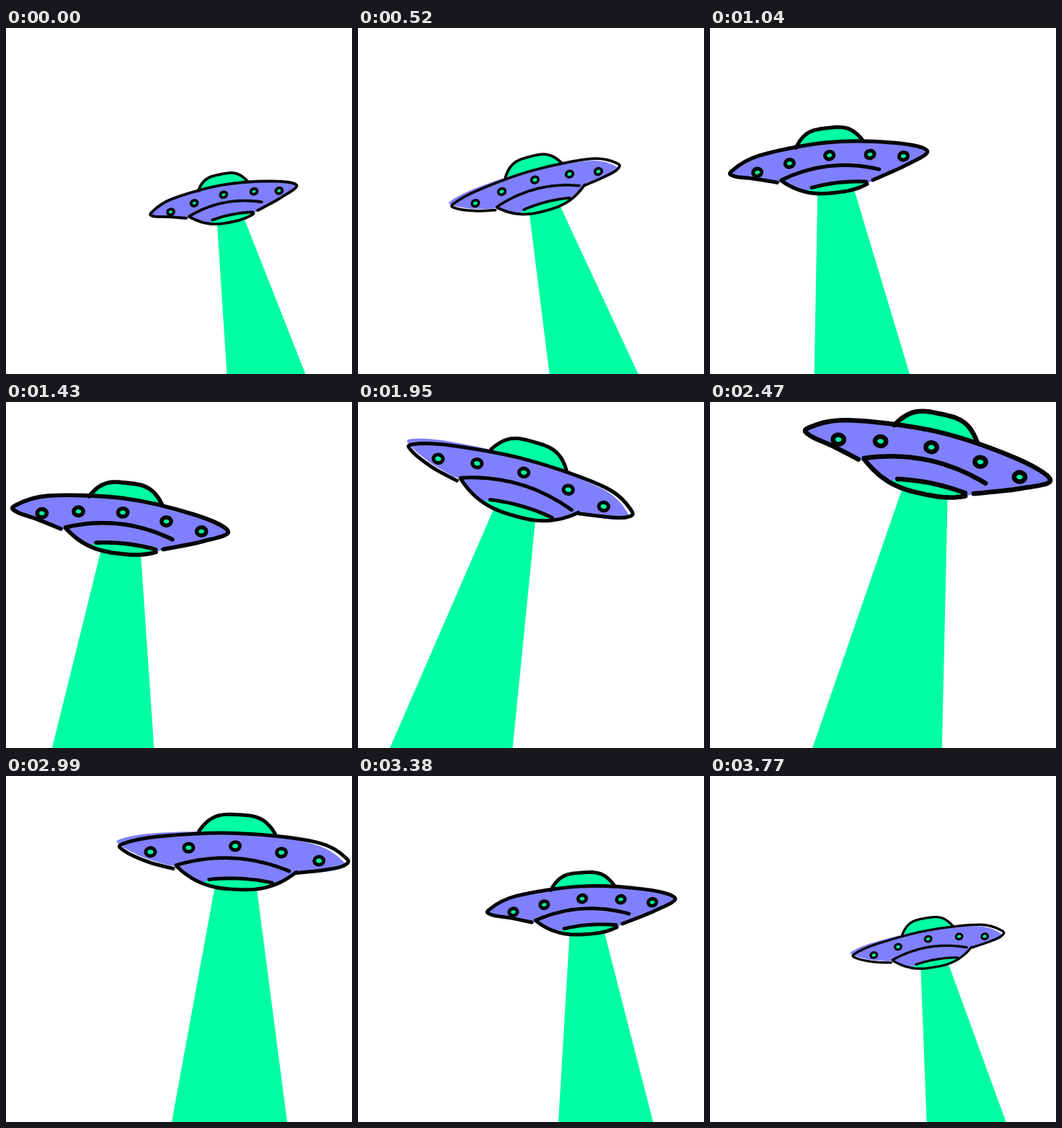
An HTML page with a canvas for the animation above (3.9 s loop, 480 by 480 pixels).

```html
<!DOCTYPE html>
<html lang="en">
<head>
<meta charset="utf-8">
<title>Flying saucer</title>
<style>
  html, body { margin: 0; width: 100%; height: 100%; overflow: hidden; background: #fff; }
  canvas { display: block; width: 480px; height: 480px; }
</style>
</head>
<body>
<canvas id="stage" width="480" height="480"></canvas>
<script>
const ctx = document.getElementById('stage').getContext('2d');
const GREEN = '#00ffa2', PURPLE = '#8080ff', INK = '#050505';
const STEP = 130, STEPS = 30, HOLD = 4, SPAN = 320;

// Key poses: step, centre x, centre y, tip-to-tip length, tilt in degrees
const keys = [
  [0, 302, 238.5, 207.7, -11.1],
  [4, 246, 219, 239, -14.5],
  [5, 218, 208, 248, -15],
  [11, 159, 163.5, 302, 6.5],
  [15, 225, 108, 324, 16.1],
  [19, 302.5, 74, 348, 11.7],
  [23, 315.5, 108, 317.5, 3],
  [25, 312.5, 156, 282, -1.8],
  [29, 302.5, 233.5, 211.6, -9.6]
];

// The saucer is drawn level, centred between its tips.
// Arch: height follows 1 - |t|^power between t = from and t = to.
function arch(mid, half, end, rise, power, from = -1, to = 1) {
  return Array.from({ length: 25 }, (_, i) => {
    const t = from + (to - from) * i / 24;
    return [mid + half * t, end + rise * (1 - Math.abs(t) ** power)];
  });
}
const hull = (from, to) => arch(5, 84, 21, 28.5, 2.6, from, to);
const dome = arch(4, 54, -29, -26, 3.4);
const brow = arch(0, 79, 20, -14, 2);
const slot = arch(12, 44, 37.5, -3.5, 2);
const lamps = [-2, -1, 0, 1, 2].map(k => {
  const d = Math.abs(k);
  return [k * (71 - 6 * d) + 2, 4.2 * d + 1.5 * d * d - 11];
});
const beam = [[-22, 35], [33, 35], [128, 552], [-89, 552]];

// Two takes of the drawing; slip is how far the colour is turned off the line
const takes = [
  {
    ink: 6, slip: 0, hullEnd: 0.62, lampSize: 7,
    rim: [[-86, 23], [-122, 13], [-152, 6], [-157, -3], [-110, -23], [0, -32],
          [106, -20], [159, -1], [123, 18], [67, 36]]
  },
  {
    ink: 5, slip: 0.035, hullEnd: 1, lampSize: 6.6,
    rim: [[-83, 25], [-120, 17], [-154, 3], [-155, -6], [-104, -19], [3, -29],
          [114, -22.5], [158, -2], [154, 9], [127, 16], [90, 22]]
  }
];

// Key by index, wrapping around the loop
function key(i) {
  const n = keys.length, turn = Math.floor(i / n);
  const [step, ...rest] = keys[i - turn * n];
  return [step + turn * STEPS, ...rest];
}

function slope(i, c) {
  const a = key(i - 1), b = key(i), d = key(i + 1);
  const h0 = b[0] - a[0], h1 = d[0] - b[0];
  return ((b[c] - a[c]) / h0 * h1 + (d[c] - b[c]) / h1 * h0) / (h0 + h1);
}

// Smooth closed motion through the keys
function pose(step) {
  let i = keys.length - 1;
  while (keys[i][0] > step) i--;
  const a = key(i), b = key(i + 1), h = b[0] - a[0], u = (step - a[0]) / h;
  const ease = u * u * (3 - 2 * u);
  return [1, 2, 3, 4].map(c =>
    a[c] + (b[c] - a[c]) * ease +
    h * u * (1 - u) * ((1 - u) * slope(i, c) - u * slope(i + 1, c)));
}

// Smooth curve through the points
function trace(pts, join) {
  const at = i => pts[Math.max(0, Math.min(pts.length - 1, i))];
  if (join) ctx.lineTo(...pts[0]); else ctx.moveTo(...pts[0]);
  for (let i = 0; i < pts.length - 1; i++) {
    const [p, a, b, n] = [at(i - 1), at(i), at(i + 1), at(i + 2)];
    ctx.bezierCurveTo(
      a[0] + (b[0] - p[0]) / 6, a[1] + (b[1] - p[1]) / 6,
      b[0] - (n[0] - a[0]) / 6, b[1] - (n[1] - a[1]) / 6, b[0], b[1]);
  }
}

function fill(color, ...curves) {
  ctx.beginPath();
  curves.forEach((pts, i) => trace(pts, i > 0));
  ctx.fillStyle = color;
  ctx.fill();
}

function stroke(pts) {
  ctx.beginPath();
  trace(pts);
  ctx.stroke();
}

function lamp([x, y], size) {
  ctx.beginPath();
  ctx.ellipse(x, y, size, size * 0.85, -0.15, 0, 7);
  ctx.fillStyle = GREEN;
  ctx.fill();
  ctx.stroke();
}

function drawSaucer({ ink, slip, hullEnd, lampSize, rim }) {
  ctx.beginPath();
  beam.forEach(p => ctx.lineTo(...p));
  ctx.fillStyle = GREEN;
  ctx.fill();

  fill(GREEN, dome);
  ctx.save();
  ctx.translate(-115 * slip, -30 * slip);
  ctx.rotate(slip);
  fill(PURPLE, rim);
  ctx.restore();
  fill(PURPLE, brow, hull(1, -1));
  fill(GREEN, slot, hull(0.65, -0.56));

  ctx.strokeStyle = INK;
  ctx.lineWidth = ink;
  [dome, rim, hull(-1, hullEnd), brow, slot].forEach(stroke);
  lamps.forEach(p => lamp(p, lampSize));
}

function draw() {
  const step = Math.floor(performance.now() / STEP) % STEPS;
  const [x, y, size, tilt] = pose(step);
  ctx.setTransform(1, 0, 0, 1, 0, 0);
  ctx.fillStyle = '#fff';
  ctx.fillRect(0, 0, 480, 480);
  ctx.translate(x, y);
  ctx.rotate(tilt * Math.PI / 180);
  ctx.scale(size / SPAN, size / SPAN);
  ctx.lineCap = ctx.lineJoin = 'round';
  drawSaucer(takes[Math.floor(step / HOLD) % 2]);
  requestAnimationFrame(draw);
}
draw();
</script>
</body>
</html>
```
